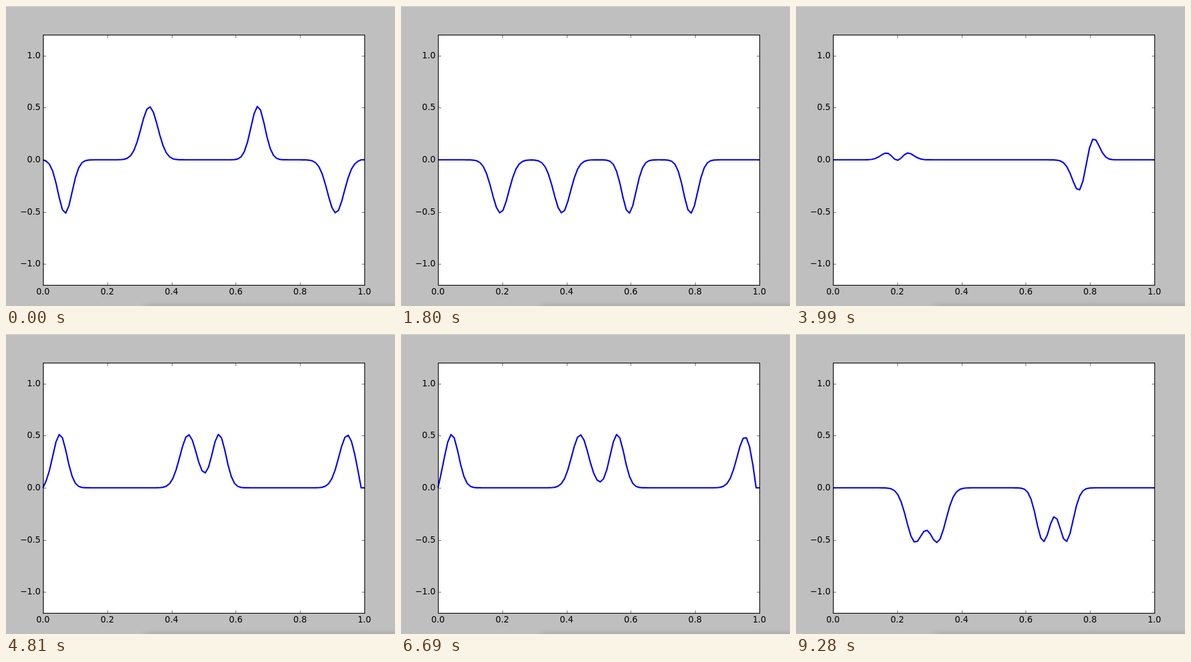
Write an HTML page that moves like this. It is 610 px wide and 470 px high and loops after 9410 ms.

```html
<!DOCTYPE html>
<html lang="en">
<head>
<meta charset="utf-8">
<title>Waves on a string</title>
<style>
  html, body { margin: 0; width: 100%; height: 100%; overflow: hidden; background: #bfbfbf; }
  svg { display: block; }
  text { font: 13.33px "DejaVu Sans", sans-serif; }
</style>
</head>
<body>
<svg width="610" height="470" viewBox="0 0 610 470">
  <defs>
    <filter id="blur" x="-20%" y="-200%" width="140%" height="500%">
      <feGaussianBlur stdDeviation="6"/>
    </filter>
  </defs>
  <rect width="610" height="470" fill="#bfbfbf"/>
  <rect width="610" height="1" fill="#dcdcdc"/>
  <rect x="218" y="473" width="460" height="30" opacity=".35" filter="url(#blur)"/>
  <rect x="58.5" y="45.5" width="504" height="392" fill="#fff"/>
  <polyline id="wave" fill="none" stroke="#00f" stroke-width="2.22" stroke-linejoin="round"/>
  <path id="ticks" stroke="#000" stroke-width=".556"/>
  <rect x="58.5" y="45.5" width="504" height="392" fill="none" stroke="#000" stroke-width="1.11"/>
  <g id="labels"></g>
</svg>
<script>
const LOOP = 9410, TICKS = 141, POINTS = 100, WALL = 98;
const px = x => 58 + 504 * x;
const py = y => 241 - 163.33 * y;
const byId = id => document.getElementById(id);

// Axes
let ticks = '', labels = '';
for (let i = 0; i <= 5; i++) {
  const x = Math.round(px(i / 5));
  ticks += `M${x + .5} 437v-4M${x + .5} 46v4`;
  labels += `<text x="${px(i / 5)}" y="452" text-anchor="middle">${(i / 5).toFixed(1)}</text>`;
}
for (let i = -2; i <= 2; i++) {
  const y = Math.round(py(i / 2));
  const label = (i < 0 ? '\u2212' : '') + Math.abs(i / 2).toFixed(1);
  ticks += `M59 ${y + .5}h4M562 ${y + .5}h-4`;
  labels += `<text x="54.3" y="${y + 4}" text-anchor="end">${label}</text>`;
}
byId('ticks').setAttribute('d', ticks);
byId('labels').innerHTML = labels;

// Key points [tick, wave step]; the playback speed varies slightly between them
const keys = [[0, 36], [14, 66], [40, 113], [46, 129], [59, 146], [84, 195], [113, 242], [139, 290]];
const lastStep = keys.at(-1)[1];

function stepAt(tick) {
  const next = keys.findIndex(([t]) => t > tick);
  if (next < 0) return lastStep;
  const [t0, n0] = keys[next - 1], [t1, n1] = keys[next];
  return Math.round(n0 + (n1 - n0) * (tick - t0) / (t1 - t0));
}

// Wave equation by leapfrog with Courant number 1, both ends fixed, starting at rest
const pulse = (x, center, sharpness) => Math.exp(-sharpness * (x - center) ** 2);
const start = Array.from({ length: POINTS }, (_, i) => {
  const x = i / (POINTS - 1);
  return i && i < WALL ? pulse(x, .3, 1000) + pulse(x, .7, 710) : 0;
});
const states = [start];
for (let n = 0; n < lastStep; n++) {
  const u = states[n], before = states[n - 1] || start;
  states.push(u.map((_, i) => i && i < WALL ? u[i - 1] + u[i + 1] - before[i] : 0));
}

function draw() {
  const tick = Math.floor(performance.now() % LOOP / LOOP * TICKS);
  const points = states[stepAt(tick)].map((u, i) => `${px(i / (POINTS - 1)).toFixed(2)},${py(u).toFixed(2)}`);
  byId('wave').setAttribute('points', points.join(' '));
  requestAnimationFrame(draw);
}
draw();
</script>
</body>
</html>
```
